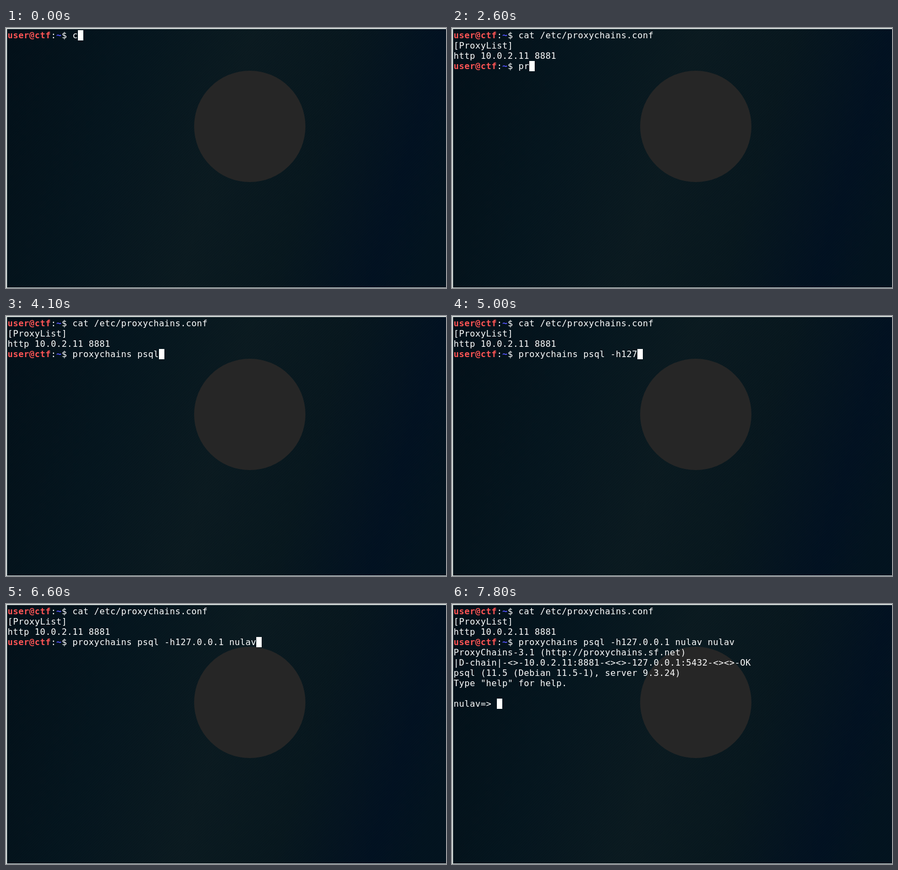
An HTML page with a canvas that plays this animation: 814x481 px, repeating every 8 s.

```html
<!DOCTYPE html>
<html lang="en">
<head>
<meta charset="utf-8">
<title>Terminal session</title>
<style>
  html, body { margin: 0; width: 100%; height: 100%; overflow: hidden; background: #07161f; }
  canvas { display: block; }
</style>
</head>
<body>
<canvas id="stage" width="814" height="481"></canvas>
<script>
const W = 814, H = 481, LOOP = 8000, TICK = 100;
const CELL_W = 10, CELL_H = 19, LEFT = 3, TOP = 4, ASCENT = 15;
const FONT = '16px "DejaVu Sans Mono", monospace';
const WHITE = '#ffffff', RED = '#ff5555', BLUE = '#5555ff';
const ctx = document.getElementById('stage').getContext('2d');

// Bursts of typing: start time, then the keys that arrive on each tick ("|" separates ticks).
const catKeys = [
  [0, 'c'], [100, 'a|t '], [400, '/|e'], [700, 'tc|/p|ro|xy|chains.conf'],
];
const psqlKeys = [
  [2000, 'p'], [2600, 'r'], [2800, 'o|x|y|ch|a|i|n|s| '], [3800, 'p'],
  [4000, 's|ql| '], [4600, '-'], [4800, 'h|12|7'], [5300, '.|0|.0|.|1'],
  [5900, ' '], [6300, 'n|u|la|v| |n'], [7100, 'u|l|a|v'],
];
const PROXY_OUTPUT = 1500, BANNER = 7700, CONNECTED = 7800;

function typed(bursts, time) {
  let text = '';
  for (const [start, keys] of bursts) {
    keys.split('|').forEach((key, i) => {
      if (time >= start + i * TICK) text += key;
    });
  }
  return text;
}

function screenLines(time) {
  const lines = ['$' + typed(catKeys, time)];
  if (time >= PROXY_OUTPUT) {
    lines.push('[ProxyList]', 'http 10.0.2.11 8881', '$' + typed(psqlKeys, time));
  }
  if (time >= BANNER) lines.push('ProxyChains-3.1 (http://proxychains.sf.net)', '');
  if (time >= CONNECTED) {
    lines.pop();
    lines.push(
      '|D-chain|-<>-10.0.2.11:8881-<><>-127.0.0.1:5432-<><>-OK',
      'psql (11.5 (Debian 11.5-1), server 9.3.24)',
      'Type "help" for help.', '', 'nulav=> ');
  }
  return lines;
}

// Writes text on the character grid and returns the next free column.
function write(text, col, row, color = WHITE, bold = false) {
  ctx.fillStyle = color;
  ctx.font = (bold ? 'bold ' : '') + FONT;
  for (const char of text) {
    ctx.fillText(char, LEFT + col++ * CELL_W, TOP + ASCENT + row * CELL_H);
  }
  return col;
}

function writeLine(line, row) {
  if (line[0] !== '$') return write(line, 0, row);
  let col = write('user@ctf', 0, row, RED, true);
  col = write(':', col, row);
  col = write('~', col, row, BLUE, true);
  return write('$ ' + line.slice(1), col, row);
}

function gradient(x0, y0, x1, y1, stops) {
  const fill = ctx.createLinearGradient(x0, y0, x1, y1);
  stops.forEach(([at, color]) => fill.addColorStop(at, color));
  return fill;
}

function drawWallpaper() {
  ctx.fillStyle = gradient(0, 60, W, 300, [
    [0, '#03111a'], [0.25, '#05161f'], [0.5, '#0b1b21'],
    [0.7, '#08181f'], [0.9, '#021222'], [1, '#031420'],
  ]);
  ctx.fillRect(0, 0, W, H);

  ctx.strokeStyle = 'rgba(0, 0, 0, 0.09)';
  ctx.lineWidth = 1;
  ctx.beginPath();
  for (let x = 0; x < W + H; x += 5) {
    ctx.moveTo(x, 0);
    ctx.lineTo(x - H, H);
  }
  ctx.stroke();

  ctx.fillStyle = '#262626';
  ctx.beginPath();
  ctx.arc(451, 182, 103, 0, Math.PI * 2);
  ctx.fill();

  ctx.fillStyle = '#d3dad8';
  ctx.fillRect(0, 0, W, 2);
  ctx.fillRect(0, 0, 2, H);
  ctx.fillRect(0, H - 1, W, 1);
}

function draw(now) {
  drawWallpaper();
  const lines = screenLines(now % LOOP);
  let col = 0;
  lines.forEach((line, row) => { col = writeLine(line, row); });
  ctx.fillStyle = WHITE;
  ctx.fillRect(LEFT + col * CELL_W, TOP + (lines.length - 1) * CELL_H, CELL_W, CELL_H);
}

let startTime;
function frame(now) {
  startTime ??= now;
  draw(now - startTime);
  requestAnimationFrame(frame);
}
requestAnimationFrame(frame);
</script>
</body>
</html>
```
